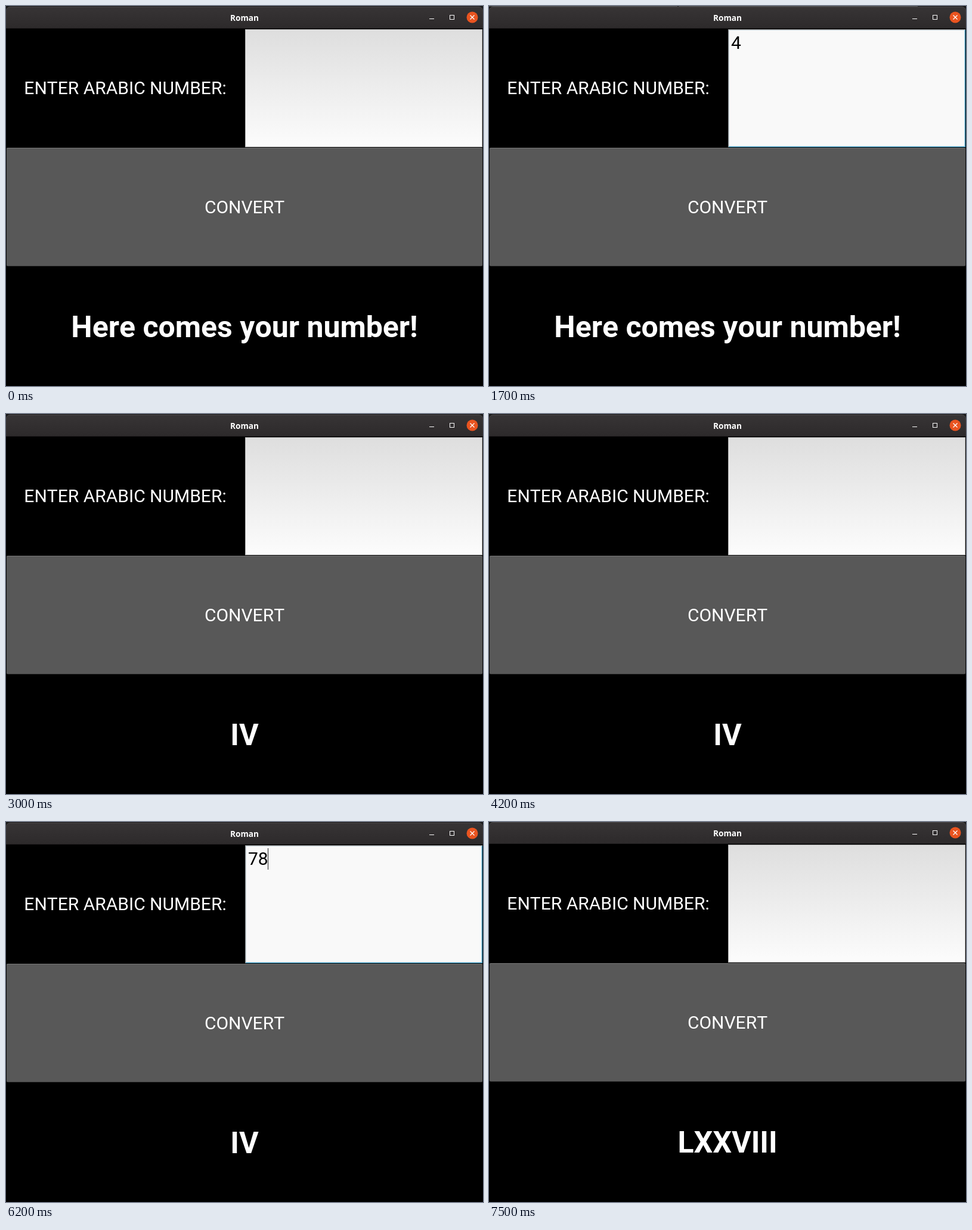
An HTML page with a canvas that plays this animation: 800x638 px, repeating every 8 s.

```html
<!DOCTYPE html>
<html lang="en">
<head>
<meta charset="utf-8">
<title>Roman</title>
<style>
  html, body { margin: 0; width: 100%; height: 100%; overflow: hidden; background: #000; }
  canvas { display: block; }
</style>
</head>
<body>
<canvas id="stage" width="800" height="638"></canvas>
<script>
const ctx = document.getElementById('stage').getContext('2d');
const LOOP = 8000;
const GREETING = 'Here comes your number!';

// Each state holds from its start time until the next one begins.
const states = [
  { at: 0, result: GREETING },
  { at: 500, result: GREETING, focused: true, input: '4', backdrop: true },
  { at: 2500, result: 'IV', focused: true, input: '', caret: '#ff0000', pressed: true },
  { at: 3000, result: 'IV' },
  { at: 5000, result: 'IV', focused: true, input: '78', caret: '#222' },
  { at: 7000, result: 'LXXVIII', focused: true, input: '', pressed: true },
  { at: 7500, result: 'LXXVIII', shift: -1 }
];

function rect(x, y, w, h, fill) {
  ctx.fillStyle = fill;
  ctx.fillRect(x, y, w, h);
}

function roundRect(x, y, w, h, radius, fill) {
  ctx.fillStyle = fill;
  ctx.beginPath();
  ctx.roundRect(x, y, w, h, radius);
  ctx.fill();
}

function vertical(top, bottom, from, to) {
  const gradient = ctx.createLinearGradient(0, top, 0, bottom);
  gradient.addColorStop(0, from);
  gradient.addColorStop(1, to);
  return gradient;
}

function text(string, x, y, font, color = '#fff', align = 'center') {
  ctx.font = font;
  ctx.textAlign = align;
  ctx.fillStyle = color;
  ctx.fillText(string, x, y);
}

function drawTitleBar(backdrop) {
  rect(0, 0, 800, 8, '#161616');
  if (backdrop) {
    rect(0, 0, 316, 1, '#505050');
    rect(318, 0, 401, 1, '#505050');
  }
  roundRect(0, 1, 800, 37, [7, 7, 0, 0], '#4a4748');
  roundRect(0, 2, 800, 36, [7, 7, 0, 0], vertical(2, 37, '#373435', '#2d2a2b'));
  rect(0, 37, 800, 1, '#1b191a');
  text('Roman', 400, 25, 'bold 13.6px "Noto Sans", sans-serif');

  rect(710, 21, 8, 1, '#fff');
  ctx.strokeStyle = '#fff';
  ctx.lineWidth = 1;
  ctx.strokeRect(744.5, 15.5, 7, 7);

  ctx.fillStyle = '#e95420';
  ctx.beginPath();
  ctx.arc(782, 19, 9.5, 0, Math.PI * 2);
  ctx.fill();
  ctx.lineWidth = 1.3;
  ctx.beginPath();
  ctx.moveTo(778.5, 15.5);
  ctx.lineTo(785.5, 22.5);
  ctx.moveTo(785.5, 15.5);
  ctx.lineTo(778.5, 22.5);
  ctx.stroke();
}

function drawInput({ focused, input, caret, pressed }) {
  if (!focused) {
    rect(401, 39, 398, 198, '#b5b5b5');
    rect(402, 40, 396, 196, vertical(40, 236, '#dedede', '#fcfcfc'));
    return;
  }
  rect(401, 39, 398, 198, pressed ? '#72b7d2' : '#35a5d5');
  rect(401, 39, 398, 1, '#9b9b9b');
  rect(401, 39, 1, 198, '#929292');
  rect(402, 40, 396, 196, '#c5d3da');
  rect(403, 41, 394, 194, '#f9f9f9');
  const font = '30px Roboto, sans-serif';
  text(input, 406, 72, font, '#000', 'left');
  if (caret) {
    const x = Math.floor(406 + ctx.measureText(input).width);
    rect(x, 44, 1, 36, caret);
  }
}

function drawButton(pressed) {
  const [edge, shine, face] = pressed
    ? ['#237090', '#4fb1d8', '#33a3d0']
    : ['#3d3d3d', '#777777', '#585858'];
  roundRect(1, 238, 798, 199, 2, edge);
  roundRect(1, 238, 798, 198, 2, shine);
  roundRect(1, 239, 798, 197, 2, face);
  text('CONVERT', 400, 348, '30px Roboto, sans-serif');
}

function draw(state) {
  rect(0, 0, 800, 638, '#000');
  ctx.save();
  ctx.translate(0, state.shift || 0);
  drawTitleBar(state.backdrop);
  text('ENTER ARABIC NUMBER:', 200, 148, '30px Roboto, sans-serif');
  drawInput(state);
  drawButton(state.pressed);
  text(state.result, 400, 556, 'bold 50px Roboto, sans-serif');
  ctx.restore();
}

ctx.fontKerning = 'none';
const start = performance.now();

function tick() {
  const time = (performance.now() - start) % LOOP;
  draw(states.findLast(state => state.at <= time));
  requestAnimationFrame(tick);
}
tick();
</script>
</body>
</html>
```
